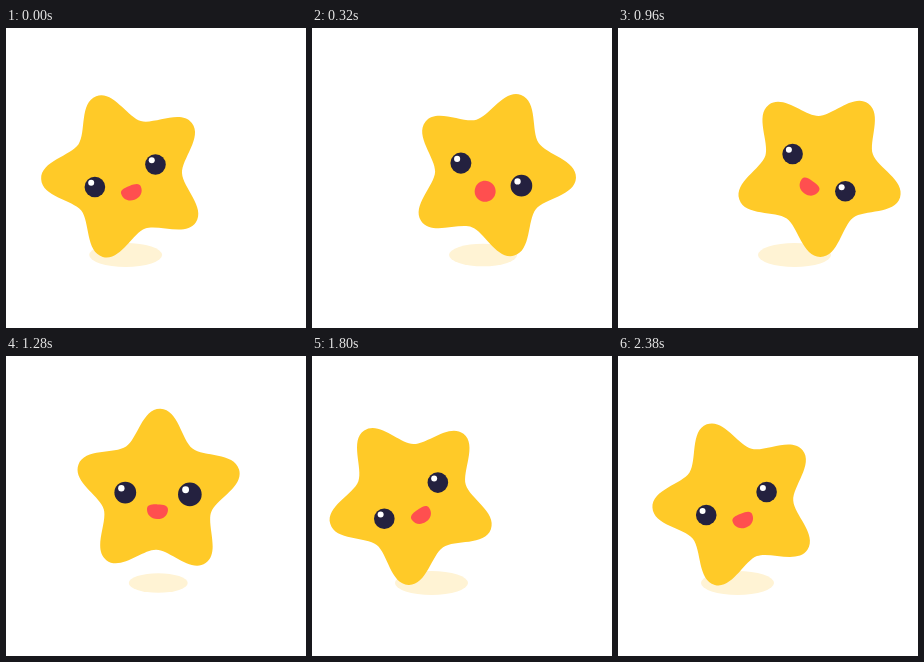
Animation of 300 by 300 pixels, one loop 2.4 s. Source, as an HTML page:

```html
<!DOCTYPE html>
<html lang="en">
<head>
<meta charset="utf-8">
<title>Rocking star</title>
<style>
  html, body { margin: 0; width: 100%; height: 100%; overflow: hidden; background: #fff; }
  svg { display: block; width: 100%; height: 100%; }
</style>
</head>
<body>
<svg viewBox="0 0 300 300">
  <ellipse id="shadow" cy="227" fill="#fff3d4"/>
  <g id="star">
    <path id="body" fill="#ffca28"/>
    <path id="mouth" fill="#ff4f4f"/>
  </g>
  <g id="eyeL"><circle r="10.3" fill="#24213f"/><circle cx="-3.7" cy="-4.1" r="3" fill="#fff"/></g>
  <g id="eyeR"><circle r="10.3" fill="#24213f"/><circle cx="-3.7" cy="-4.1" r="3" fill="#fff"/></g>
</svg>
<script>
const LOOP = 2400, JUMP = 355, RAD = Math.PI / 180;
const $ = id => document.getElementById(id);
const set = (id, attrs) => { for (const k in attrs) $(id).setAttribute(k, attrs[k]); };
const clamp = v => Math.min(1, Math.max(0, v));
const mix = (a, b, k) => a + (b - a) * k;

// [time in ms, tilt in degrees]
const tilts = [[0, -20.4], [150, 1], [320, 20.4], [540, 27.7], [640, 32.3], [850, 36.5],
  [960, 35.3], [1080, 31.5], [1280, 1.8], [1480, -20.5], [1620, -28], [1800, -34],
  [1940, -36.7], [2160, -32], [2380, -20.9], [2400, -20.4]];
const slopes = tilts.slice(1).map(([t, r], i) => (r - tilts[i][1]) / (t - tilts[i][0]));

// Monotone tangent: harmonic mean of the neighbouring slopes
function tangent(i) {
  const n = slopes.length, a = slopes[(i + n - 1) % n], b = slopes[i % n];
  return a * b > 0 ? 2 * a * b / (a + b) : 0;
}

function tiltAt(t) {
  let i = 0;
  while (t >= tilts[i + 1][0]) i++;
  const [t0, r0] = tilts[i], [t1, r1] = tilts[i + 1];
  const d = t1 - t0, k = (t - t0) / d, q = 1 - k;
  return r0 * (1 + 2 * k) * q * q + r1 * k * k * (3 - 2 * k)
    + d * k * q * (tangent(i) * q - tangent(i + 1) * k);
}

function starPath() {
  const at = (deg, r, side) => {
    const s = Math.sin(deg * RAD), c = Math.cos(deg * RAD);
    return `${(r * s + side * c).toFixed(2)},${(side * s - r * c).toFixed(2)} `;
  };
  const TIP = 84.5, DIP = 56.5, tipH = 18, dipH = 14;
  let d = 'M' + at(0, TIP, 0);
  for (let a = 0; a < 360; a += 72) {
    d += 'C' + at(a, TIP, tipH) + at(a + 36, DIP, -dipH) + at(a + 36, DIP, 0);
    d += 'C' + at(a + 36, DIP, dipH) + at(a + 72, TIP, -tipH) + at(a + 72, TIP, 0);
  }
  return d + 'Z';
}

// open: 0 is a smile, 1 is a round mouth
function mouthPath(open) {
  const w = 10.5, mid = mix(-2.2, 0, open), top = mix(-7.2, -w, open), low = mix(7.5, w, open);
  const up = mix(-6.6, -5.8, open), down = mix(3.6, 5.8, open), h = mix(6.2, 5.8, open);
  return `M${-w},${mid}C${-w},${up} ${-h},${top} 0,${top}S${w},${up} ${w},${mid}`
    + `C${w},${down} ${h},${low} 0,${low}S${-w},${down} ${-w},${mid}Z`;
}

function draw(t) {
  const tilt = tiltAt(t), a = tilt * RAD;
  const right = clamp(t / JUMP), left = clamp((t - 1130) / JUMP);
  const lift = 4 * (right * (1 - right) + left * (1 - left));
  const x = 149.5 + 1.47 * tilt;
  const lean = (36 - Math.max(Math.abs(tilt), 20.4)) * RAD;
  const y = 228.9 - 84.5 * Math.cos(lean) - 10.7 * lift * lift;

  set('shadow', { cx: 119.5 + 57 * (right - left), rx: 36.5 - 7.2 * lift, ry: 12 - 2.2 * lift });
  set('star', { transform: `translate(${x} ${y}) rotate(${tilt})` });

  const near = clamp(1 - Math.min(Math.abs(t - 320), Math.abs(t - 1450)) / 165);
  const open = near * near * (3 - 2 * near);
  set('mouth', { d: mouthPath(open), transform: 'translate(0 18.3)' });

  const eye = (id, ex, grow) => set(id, { transform:
    `translate(${x - 0.4 + ex * Math.cos(a)} ${y + 0.2 + ex * Math.sin(a)}) scale(${1 + grow * lift})` });
  eye('eyeL', -32.3, 0.06);
  eye('eyeR', 32.3, 0.15);
}

set('body', { d: starPath() });
const start = performance.now();
function frame() {
  draw((performance.now() - start) % LOOP);
  requestAnimationFrame(frame);
}
frame();
</script>
</body>
</html>
```
